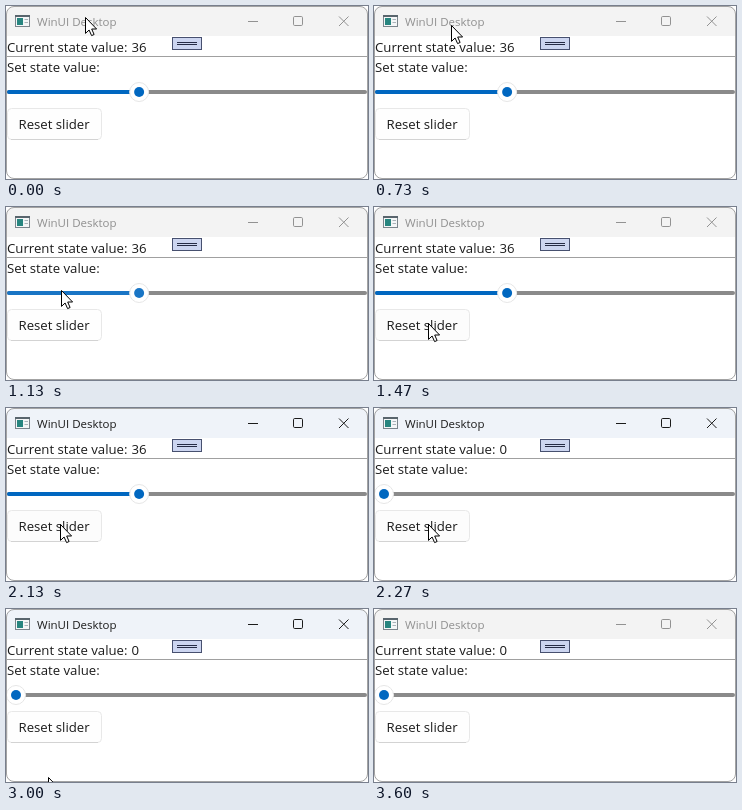
Write an HTML page that moves like this. It is 362x173 px and loops after 3.79 s.

```html
<!DOCTYPE html>
<html lang="en">
<head>
<meta charset="utf-8">
<title>Reset slider</title>
<style>
  html, body { margin: 0; width: 100%; height: 100%; overflow: hidden; background: #fff; }
  svg { display: block; width: 100vw; height: 100vh; }
  text { font: 13.2px "Open Sans", "Noto Sans", sans-serif; fill: #1b1b1b; }
  #caption { font-size: 11.5px; }
</style>
</head>
<body>
<svg viewBox="0 0 362 173">
  <clipPath id="frame"><rect width="362" height="173" rx="8"/></clipPath>
  <g clip-path="url(#frame)">
    <rect width="362" height="173" fill="#fff"/>
    <rect id="bar" width="362" height="30"/>

    <!-- title bar -->
    <g>
      <rect x="9.5" y="9.5" width="14" height="11" fill="#f4f6f7" stroke="#7b858c"/>
      <path d="M9 10H24" stroke="#59656d" stroke-width="2"/>
      <rect x="11" y="12" width="6" height="7" fill="#27857f"/>
      <path d="M18.5 13.5H22M18.5 16.5H22" stroke="#a9b3b9"/>
    </g>
    <text id="caption" x="31" y="20">WinUI Desktop</text>
    <g id="controls" fill="none">
      <path d="M242 15.5H252"/>
      <rect x="287.5" y="10.5" width="9" height="9" rx="1.2"/>
      <path d="M333 10.5L342.5 20M342.5 10.5L333 20"/>
    </g>

    <text x="1" y="46">Current state value:</text>
    <text id="value" x="125.5" y="46"></text>
    <path d="M0 50.5H362" stroke="#a0a0a0"/>
    <rect x="166.5" y="31.5" width="29" height="12" fill="#ccd5f0" stroke="#47506f"/>
    <path d="M171 36.5H191M171 38.5H191" stroke="#252b45"/>
    <text x="1" y="66">Set state value:</text>

    <!-- slider -->
    <rect x="1" y="84" width="360" height="4" rx="2" fill="#8a8a8a"/>
    <rect id="fill" x="1" y="84" height="4" rx="2"/>
    <g id="thumb">
      <circle r="9.5" fill="#fff" stroke="#e6e6e6"/>
      <circle id="dot" r="5"/>
    </g>

    <!-- button -->
    <rect id="button" x="1.5" y="102.5" width="94" height="31" rx="4" stroke="#e8e8e8"/>
    <path d="M5 133.5H92" stroke="#d3d3d3"/>
    <text id="label" x="12.5" y="123">Reset slider</text>
  </g>
  <rect x=".5" y=".5" width="361" height="172" rx="7.5" fill="none" stroke="#a3a3a3"/>
  <path id="cursor" d="M.5 .5V16.4L4.1 13L6.6 18.6L9.1 17.5L6.7 12H11.6Z"
        fill="#fff" stroke="#000" stroke-linejoin="round"/>
</svg>
<script>
const LOOP = 3790;
const TICK = 200 / 3; // the picture updates 15 times a second
// pointer stops: tick, x, y
const stops = [
  [0, 79, 11], [10, 79, 11], [11, 77, 19], [17, 55, 83], [18, 55, 83],
  [22, 54, 116], [40, 54, 116], [41, 52, 119], [46, 39, 180], [60, 39, 180]
];
const el = id => document.getElementById(id);
const set = (id, attrs) => {
  for (const [name, value] of Object.entries(attrs)) el(id).setAttribute(name, value);
};

function pointerAt(tick) {
  const next = stops.findIndex(stop => stop[0] > tick);
  const [t0, x0, y0] = stops[next - 1];
  const [t1, x1, y1] = stops[next];
  const u = (tick - t0) / (t1 - t0);
  return [Math.round(x0 + (x1 - x0) * u), Math.round(y0 + (y1 - y0) * u)];
}

function draw(time) {
  const tick = Math.floor((time + 5) / TICK);
  const [x, y] = pointerAt(tick);
  const active = tick >= 32 && tick < 54;
  const pressed = tick === 33;
  const value = tick < 34 ? 36 : 0;
  const overSlider = y >= 70 && y < 102;
  const overButton = y >= 102 && y < 134;
  const accent = overSlider ? '#1975c5' : '#0067c0';
  const thumbX = 10 + value * 3.42;

  set('bar', { fill: active ? '#eff3f9' : '#f3f3f3' });
  el('caption').style.fill = active ? '#1b1b1b' : '#8f8f8f';
  set('controls', { stroke: active ? '#1b1b1b' : '#929292' });
  el('value').textContent = value;
  set('fill', { width: value ? thumbX - 1 : 0, fill: accent });
  set('thumb', { transform: `translate(${thumbX} 86)` });
  set('dot', { fill: accent });
  set('button', { fill: overButton ? '#fcfcfc' : '#fefefe' });
  el('label').style.fill = pressed ? '#5d5d5d' : '#1b1b1b';
  set('cursor', { transform: `translate(${x} ${y})` });
}

const start = performance.now();
function loop() {
  draw((performance.now() - start) % LOOP);
  requestAnimationFrame(loop);
}
loop();
</script>
</body>
</html>
```
